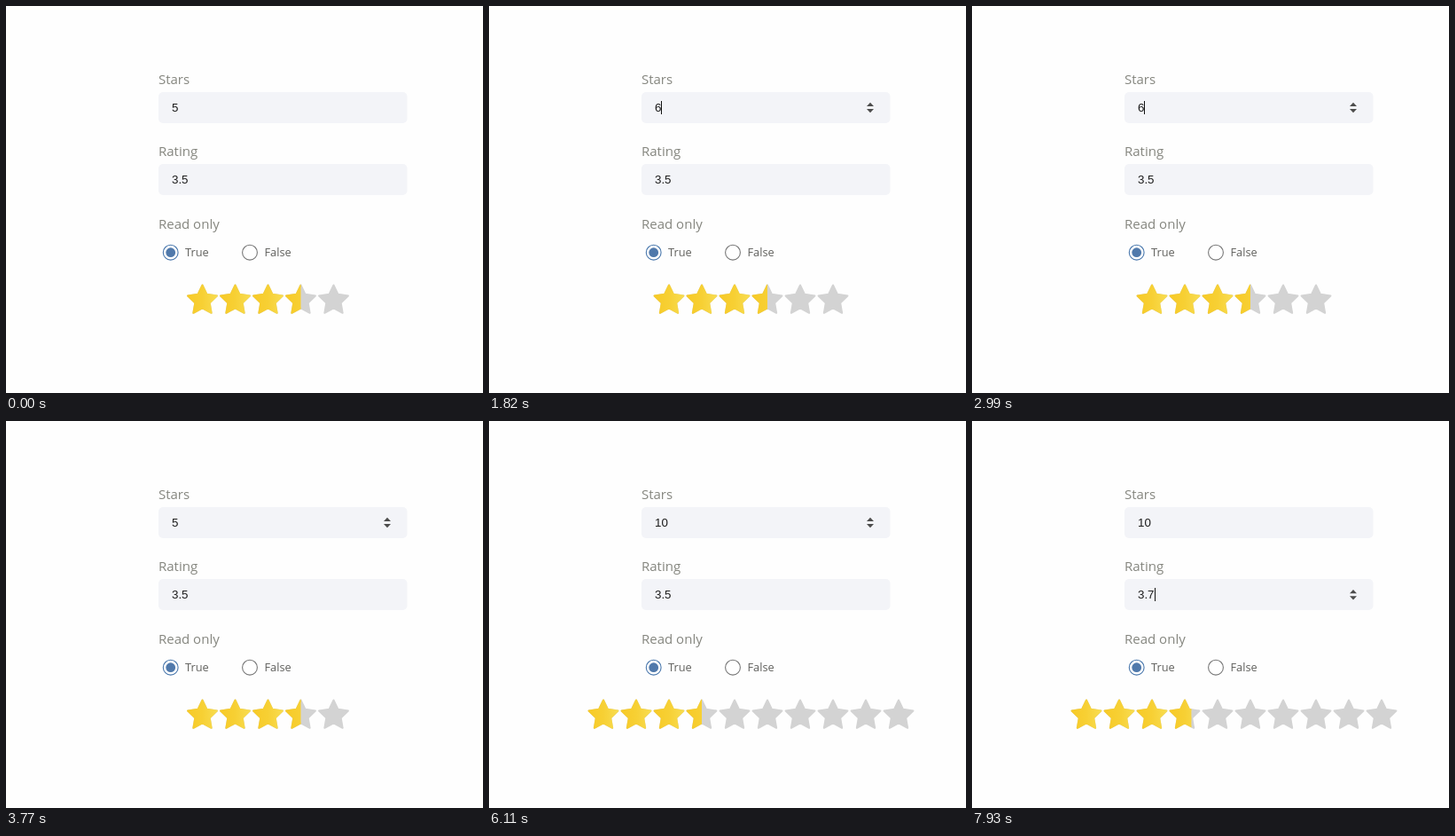
Recreate the animation shown at these times as an HTML page. Size 538x436 px, loop 8 s.

```html
<!DOCTYPE html>
<html lang="en">
<head>
<meta charset="utf-8">
<title>Star rating</title>
<style>
  html, body { margin: 0; width: 100%; height: 100%; overflow: hidden; background: #fefefe; }
  svg { display: block; width: 538px; height: 436px; }
  .label { font: 15px "Open Sans", "Noto Sans", sans-serif; fill: #85867f; }
  .option { font: 12.8px "Open Sans", "Noto Sans", sans-serif; fill: #62625f; }
  .value { font: 13.33px "Liberation Sans", Arial, sans-serif; fill: #1c1c1c; }
  .field { fill: #f3f4f8; }
  .arrows { fill: #4c4c4c; }
  .caret { fill: #111; }
  .ring { fill: #fff; stroke-width: 1.1; }
</style>
</head>
<body>
<svg viewBox="0 0 538 436">
  <defs>
    <linearGradient id="gold">
      <stop offset="0" stop-color="#f7ca27"/>
      <stop offset=".5" stop-color="#f7d034"/>
      <stop offset="1" stop-color="#f8dc50"/>
    </linearGradient>
    <path id="arrows" d="M426 113l4-4.3 4 4.3zM426 116h8l-4 4.3z"/>
    <clipPath id="fill"><rect id="fillBox" y="300" height="60"/></clipPath>
  </defs>

  <text class="label" x="172" y="88">Stars</text>
  <rect class="field" x="172" y="97" width="280.5" height="35" rx="5"/>
  <text class="value" id="starsText" x="187" y="119"></text>
  <use class="arrows" id="starsArrows" href="#arrows"/>

  <text class="label" x="172" y="169">Rating</text>
  <rect class="field" x="172" y="178" width="280.5" height="35" rx="5"/>
  <text class="value" id="ratingText" x="187" y="200"></text>
  <use class="arrows" id="ratingArrows" href="#arrows" y="81.3"/>

  <rect class="caret" id="caret" width="1" height="15"/>

  <text class="label" x="172" y="250.5">Read only</text>
  <circle class="ring" cx="185.7" cy="277.7" r="8.4" stroke="#4a78ad"/>
  <circle cx="185.7" cy="277.7" r="5.4" fill="#5079ab"/>
  <text class="option" x="202" y="282">True</text>
  <circle class="ring" cx="275" cy="277.7" r="8.4" stroke="#777"/>
  <text class="option" x="291.5" y="282">False</text>

  <g id="empty"></g>
  <g id="full" clip-path="url(#fill)"></g>
</svg>
<script>
const LOOP = 8000, PITCH = 37, MID = 295.5, MAX = 10;
const $ = id => document.getElementById(id);

// Each list holds [start time, value] pairs.
const tracks = {
  stars: [[0, "5"], [1820, "6"], [2210, "7"], [2860, "6"], [3250, "5"],
          [5070, ""], [5330, "1"], [5590, "10"]],
  rating: [[0, "3.5"], [7800, "3."], [7930, "3.7"]],
  // Start of a blink cycle; null means no focus.
  blink: [[0, null], [1170, 1170], [1820, 1820], [2210, 2210], [2860, 2860],
          [3250, 3250], [3900, 3900], [5070, 5070], [5330, 5330], [5590, 5590],
          [7150, 7150], [7800, 7800], [7930, 7930]],
  focus: [[0, "stars"], [7150, "rating"]],
  starsArrows: [[0, false], [390, true], [7150, false]],
  ratingArrows: [[0, false], [6370, true]]
};

const at = (name, t) => tracks[name].filter(k => k[0] <= t).pop()[1];
const show = (id, on) => $(id).setAttribute("visibility", on ? "visible" : "hidden");
const textWidth = s => [...s].reduce((w, c) => w + (c === "." ? 3.7 : 7.41), 0);

function starPath() {
  const pts = [];
  for (let i = 0; i < 10; i++) {
    const a = i * Math.PI / 5, r = i % 2 ? 8.6 : 17.3;
    pts.push((r * Math.sin(a)).toFixed(2) + " " + (-r * Math.cos(a)).toFixed(2));
  }
  return "M" + pts.join("L") + "Z";
}

function addStars(group, color) {
  for (let i = 0; i < MAX; i++) {
    const p = document.createElementNS("http://www.w3.org/2000/svg", "path");
    p.setAttribute("d", starPath());
    p.setAttribute("fill", color);
    p.setAttribute("stroke", color);
    p.setAttribute("stroke-width", 2);
    p.setAttribute("stroke-linejoin", "round");
    group.append(p);
  }
}

function layStars(group, count, left) {
  [...group.children].forEach((p, i) => {
    p.setAttribute("transform", `translate(${left + (i + .5) * PITCH} 331.8)`);
    p.setAttribute("display", i < count ? "inline" : "none");
  });
}

function draw(t) {
  const stars = at("stars", t), rating = at("rating", t);
  const count = +stars, left = MID - count * PITCH / 2;
  $("starsText").textContent = stars;
  $("ratingText").textContent = rating;
  show("starsArrows", at("starsArrows", t));
  show("ratingArrows", at("ratingArrows", t));

  const onStars = at("focus", t) === "stars", start = at("blink", t);
  $("caret").setAttribute("x", 187 + Math.round(textWidth(onStars ? stars : rating)));
  $("caret").setAttribute("y", onStars ? 107 : 188);
  show("caret", start !== null && Math.floor((t - start) / 520) % 2 === 0);

  layStars($("empty"), count, left);
  layStars($("full"), count, left);
  $("fillBox").setAttribute("x", left);
  $("fillBox").setAttribute("width", Math.min(count, parseFloat(rating)) * PITCH);
}

addStars($("empty"), "#d3d3d3");
addStars($("full"), "url(#gold)");

const begin = performance.now();
function tick() {
  draw((performance.now() - begin) % LOOP);
  requestAnimationFrame(tick);
}
tick();
</script>
</body>
</html>
```
